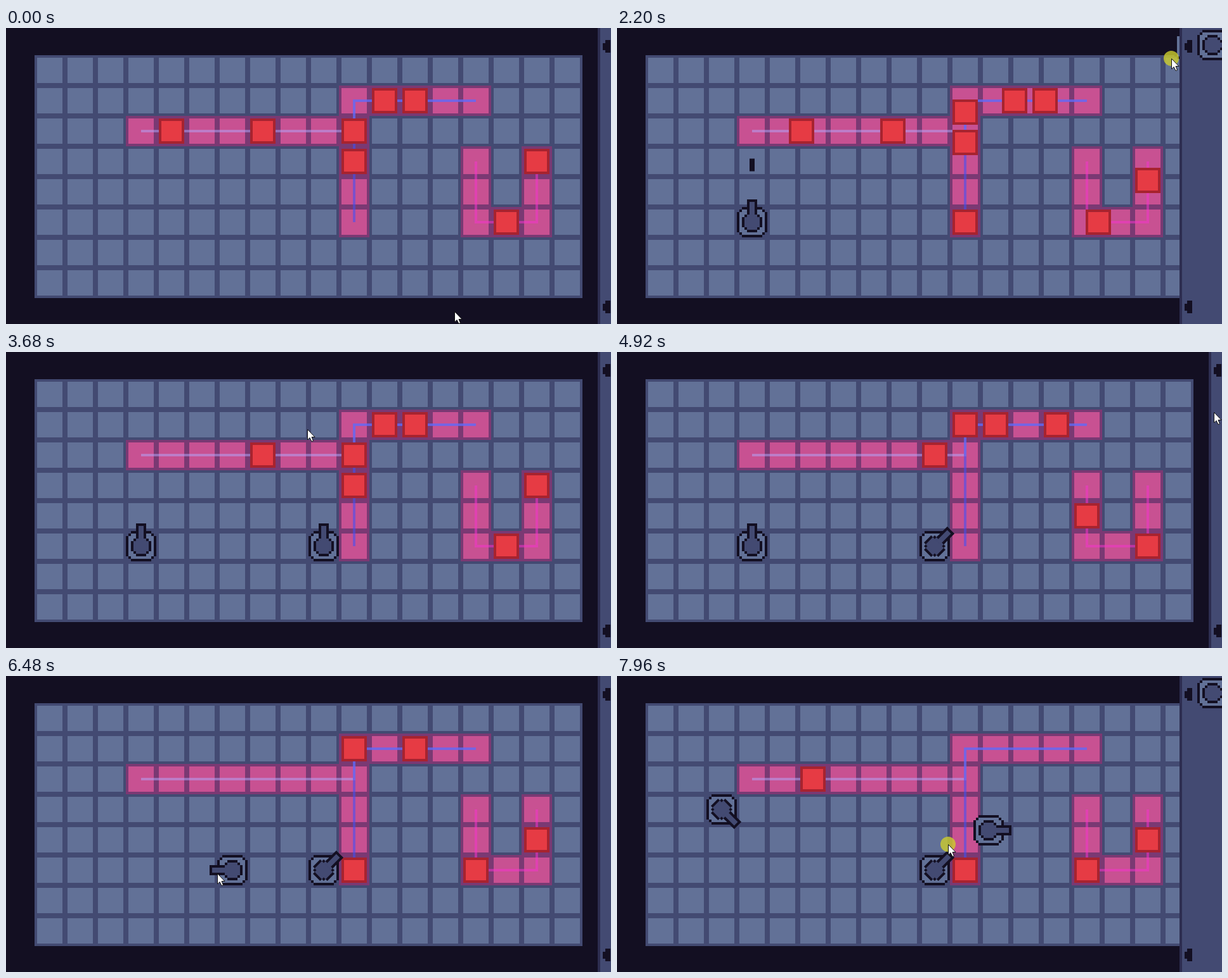
These frames come from a looping animation (954x468 px, 8 s). An HTML page with a canvas:

```html
<!DOCTYPE html>
<html>
<head>
<meta charset="utf-8">
<style>
html, body { margin: 0; width: 100%; height: 100%; overflow: hidden; background: #130f22; }
canvas { display: block; }
</style>
</head>
<body>
<canvas id="stage" width="954" height="468"></canvas>
<script>
const ctx = document.getElementById('stage').getContext('2d');
const LOOP = 8000, FRAME = 40;
const DARK = '#130f22', SLATE = '#434a72', CELL = '#627197';

// Enemies advance one cell per step with a quick ease-out; tanks fire at each step.
const STEP = 616.67, FIRST = -295, GLIDE = 104;
const MUZZLE = 65, SPEED = 0.9, RANGE = 270, ARMING = 400;
const stepStart = n => FIRST + n * STEP;
const stepAt = t => Math.floor((t - FIRST) / STEP);

// Corner cells of each route; an enemy spawns every third step.
const routes = [
  { corners: [[3, 2], [10, 2], [10, 1], [14, 1]], phase: 1, color: 'rgba(180, 170, 255, 0.5)' },
  { corners: [[10, 5], [10, 1], [14, 1]], phase: 2, color: 'rgba(60, 80, 250, 0.55)' },
  { corners: [[16, 3], [16, 5], [14, 5], [14, 3]], phase: 0, color: 'rgba(250, 50, 210, 0.5)' }
];
const gap = ([ax, ay], [bx, by]) => Math.abs(bx - ax) + Math.abs(by - ay);
for (const r of routes)
  r.length = r.corners.slice(1).reduce((sum, c, i) => sum + gap(r.corners[i], c), 0);

// Places the pointer visits: time, position.
const STOCK = [905, 28];
const visits = [
  [0, 707, 448], [400, ...STOCK], [840, 213, 300], [1100, 165, 290], [1280, 228, 211],
  [2120, ...STOCK], [2600, 490, 300], [2840, 480, 277], [3180, 475, 122], [3680, 475, 122],
  [3840, 600, 190], [4620, 600, 190], [4920, 941, 95], [5640, 213, 318], [6280, 357, 308],
  [6480, 333, 312], [6900, 165, 215], [7000, 58, 200], [7100, 230, 280], [7240, 230, 280],
  [7600, ...STOCK], [7700, ...STOCK], [7900, 586, 244], [7960, 522, 266]
];

// Each tank is dragged to a cell, then aims at the pointer until locked.
const tanks = [
  [
    { grab: 400, drop: 840, lock: 1350, cell: [3, 5] },
    { grab: 5640, drop: 6300, lock: 6600, cell: [6, 5] },
    { grab: 6600, drop: 6900, lock: 7240, cell: [2, 3] }
  ],
  [{ grab: 2120, drop: 2600, lock: 4800, cell: [9, 5] }],
  [{ grab: 7640, drop: LOOP }]
];

const center = ([col, row]) => [69 + 48 * col, 67 + 48 * row];

function pointer(t) {
  const i = visits.findIndex(v => v[0] > t);
  if (i < 0) return visits[visits.length - 1].slice(1);
  if (i === 0) return visits[0].slice(1);
  const [t0, x0, y0] = visits[i - 1], [t1, x1, y1] = visits[i];
  const u = (t - t0) / (t1 - t0), s = u * u * (3 - 2 * u);
  return [x0 + (x1 - x0) * s, y0 + (y1 - y0) * s];
}

// Direction to the pointer in eighths of a turn, averaged over a moment to swing smoothly.
function aim([x, y], t) {
  let sumX = 0, sumY = 0;
  for (let lag = 0; lag <= 120; lag += 30) {
    const [px, py] = pointer(t - lag);
    const angle = Math.round(Math.atan2(py - y, px - x) / (Math.PI / 4)) * Math.PI / 4;
    sumX += Math.cos(angle);
    sumY += Math.sin(angle);
  }
  return Math.atan2(sumY, sumX);
}

function pose(stops, t) {
  const i = stops.filter(s => s.grab <= t).length - 1;
  if (i < 0) return null;
  const { drop, lock, cell } = stops[i];
  if (t >= drop) {
    const spot = center(cell);
    return { spot, angle: aim(spot, Math.min(t, lock)), armed: t >= drop + ARMING };
  }
  const last = stops[i - 1];
  return { spot: pointer(t - 60), angle: last ? aim(center(last.cell), last.lock) : 0 };
}

function walk(corners, distance) {
  let left = Math.max(0, distance);
  for (let i = 1; i < corners.length; i++) {
    const a = corners[i - 1], b = corners[i], span = gap(a, b);
    if (left <= span) return a.map((v, k) => v + (b[k] - v) * left / span);
    left -= span;
  }
  return corners[corners.length - 1];
}

// A shot stops at the nearest enemy on its line.
function fire({ spot: [x, y], angle }, enemies, n) {
  let reach = RANGE + 20, victim = null;
  for (const e of enemies) {
    const [ex, ey] = center(walk(e.route.corners, n - e.born));
    const along = (ex - x) * Math.cos(angle) + (ey - y) * Math.sin(angle);
    const across = (ey - y) * Math.cos(angle) - (ex - x) * Math.sin(angle);
    if (along > 0 && along < reach && Math.abs(across) < 10) [reach, victim] = [along, e];
  }
  if (victim) victim.diesAt = stepStart(n) + Math.max(60, (reach - 20 - MUZZLE) / SPEED);
  return { x, y, angle, range: reach - 20 };
}

function play() {
  const turns = [];
  let enemies = [];
  for (const route of routes)
    for (let i = route.phase; i < route.length; i += 3) enemies.push({ route, born: -i });
  for (let n = 0; n <= stepAt(LOOP); n++) {
    for (const route of routes)
      if (n > 0 && (n + route.phase) % 3 === 0) enemies.push({ route, born: n });
    const guns = tanks.map(stops => pose(stops, stepStart(n))).filter(p => p && p.armed);
    turns.push({ enemies, shots: guns.map(gun => fire(gun, enemies, n)) });
    enemies = enemies.filter(e => !e.diesAt && n - e.born < e.route.length);
  }
  return turns;
}
const turns = play();

function rect(color, x, y, w, h) {
  ctx.fillStyle = color;
  ctx.fillRect(x, y, w, h);
}

function square(x, y, size, color) {
  rect(color, x - size / 2, y - size / 2, size, size);
}

function placed(x, y, angle, draw) {
  ctx.save();
  ctx.translate(x, y);
  ctx.rotate(angle);
  draw();
  ctx.restore();
}

function drawBoard() {
  rect(DARK, 0, 0, 954, 468);
  rect(SLATE, 45, 43, 864, 384);
  for (let col = 0; col < 18; col++)
    for (let row = 0; row < 8; row++) square(...center([col, row]), 40, CELL);
  for (const [size, color] of [[48, '#7a3973'], [40, '#c85192']])
    for (const { corners, length } of routes)
      for (let i = 0; i <= length; i++) square(...center(walk(corners, i)), size, color);
  ctx.lineWidth = 4;
  for (const { corners, color } of routes) {
    ctx.strokeStyle = color;
    ctx.beginPath();
    corners.forEach(c => ctx.lineTo(...center(c)));
    ctx.stroke();
  }
}

function drawTurn(t) {
  const n = stepAt(t), elapsed = t - stepStart(n), { enemies, shots } = turns[n];
  const remaining = (1 - Math.min(1, elapsed / GLIDE)) ** 3;
  for (const { route, born, diesAt } of enemies) {
    const place = n - born - remaining;
    if (t > diesAt || place >= route.length) continue;
    const [x, y] = center(walk(route.corners, place)).map(Math.round);
    square(x, y, 40, '#a7232f');
    square(x, y, 32, '#e63b44');
  }
  const distance = MUZZLE + SPEED * elapsed;
  for (const { x, y, angle, range } of shots)
    if (distance < range) placed(x, y, angle, () => rect(DARK, distance - 10, -4, 20, 8));
}

// Four sides and four stepped corners of a pixel ring.
function ring(radius, side, corner) {
  for (let i = 0; i < 4; i++) {
    rect(DARK, -side, -radius, 2 * side, 4);
    rect(DARK, -corner, -corner, 4, 4);
    ctx.rotate(Math.PI / 2);
  }
}

function drawTank([x, y], angle) {
  placed(x, y, 0, () => {
    rect(CELL, -20, -20, 40, 40);
    ring(24, 16, 20);
  });
  placed(x, y, angle, () => {
    rect(SLATE, -12, -8, 24, 16);
    rect(SLATE, -8, -12, 16, 24);
    ring(16, 8, 12);
    rect(DARK, 12, -8, 24, 16);
    rect(SLATE, 8, -4, 24, 8);
  });
}

// The panel slides out a moment after the pointer reaches the right edge.
function drawPanel(t) {
  let open = 0;
  for (let lag = 120; lag < 320; lag += 10) open += pointer(t - lag)[0] > 850 ? 1 / 20 : 0;
  const x = Math.round(933 - 83 * open);
  rect('#2d2d50', x, 0, 4, 468);
  rect(SLATE, x + 4, 0, 954 - x, 468);
  for (const y of [29, 441]) {
    rect(DARK, x + 8, y - 5, 4, 11);
    rect(DARK, x + 12, y - 10, 8, 20);
  }
  drawTank([x + 52, 27], 0);
}

const arrow = new Path2D('M.5 .5V17L4 13.5L7 19.5L9.5 18.5L7 12.5H12Z');

function drawPointer(t) {
  const [x, y] = pointer(t).map(Math.round);
  if (tanks.flat().some(s => t >= s.grab && t < s.drop)) {
    ctx.fillStyle = 'rgba(205, 205, 45, 0.8)';
    ctx.beginPath();
    ctx.arc(x, y, 12, 0, 2 * Math.PI);
    ctx.fill();
  }
  placed(x, y, 0, () => {
    ctx.fillStyle = '#fff';
    ctx.strokeStyle = '#111';
    ctx.lineWidth = 1;
    ctx.fill(arrow);
    ctx.stroke(arrow);
  });
}

function frame() {
  const t = Math.floor(performance.now() % LOOP / FRAME) * FRAME;
  drawBoard();
  drawTurn(t);
  for (const stops of tanks) {
    const tank = pose(stops, t);
    if (tank) drawTank(tank.spot.map(Math.round), tank.angle);
  }
  drawPanel(t);
  drawPointer(t);
  requestAnimationFrame(frame);
}
frame();
</script>
</body>
</html>
```
